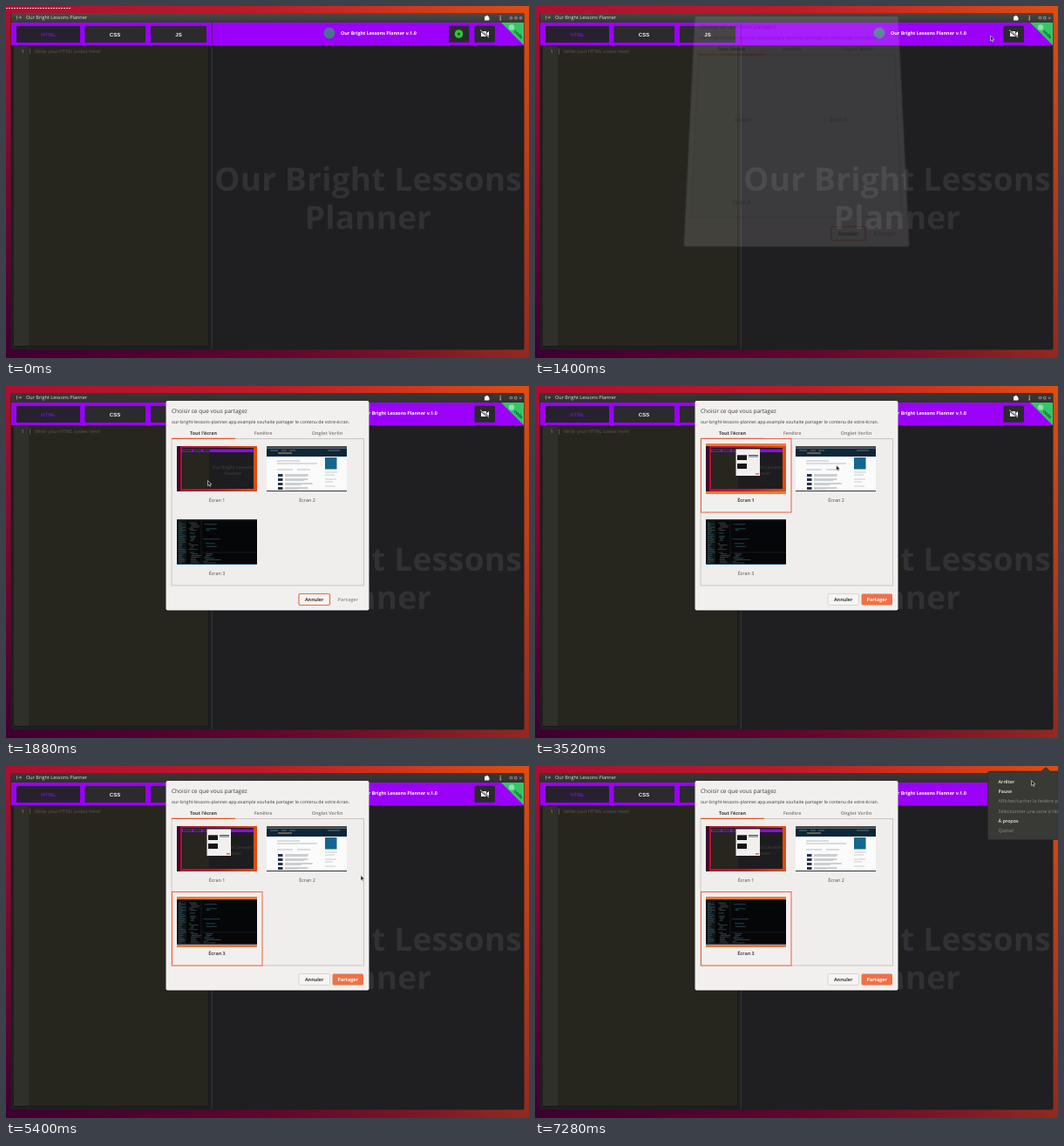
An HTML page for the animation above (7.32 s loop, 600 px wide and 404 px high).

```html
<!DOCTYPE html>
<html lang="fr">
<head>
<meta charset="utf-8">
<title>Screen sharing</title>
<style>
  html, body { margin: 0; width: 100%; height: 100%; overflow: hidden; background: #8a1238; }
  svg { position: absolute; left: 0; top: 0; width: 600px; height: 404px; }
  text { font-family: "Open Sans", "Noto Sans", sans-serif; font-size: 5.4px; text-rendering: geometricPrecision; white-space: pre; }
  .mid { text-anchor: middle; }
  .bold { font-weight: 700; }
  .tab { font-family: "Liberation Sans", Arial, sans-serif; font-size: 6px; font-weight: 700; text-anchor: middle; fill: #f4f4f4; }
  .hero { font-size: 37px; font-weight: 700; letter-spacing: .2px; text-anchor: middle; fill: #313133; }
  .off { fill: #8c8a86; }
  #dialog { transform-origin: 300px 137px; }
</style>
</head>
<body>
<svg id="desktop" viewBox="0 0 600 404">
  <defs>
    <linearGradient id="wall">
      <stop offset="0" stop-color="#b01030"/>
      <stop offset=".5" stop-color="#bf1c28"/>
      <stop offset="1" stop-color="#e04e12"/>
    </linearGradient>
    <linearGradient id="dusk" x2="0" y2="1">
      <stop offset="0" stop-color="#3a0030" stop-opacity="0"/>
      <stop offset="1" stop-color="#3a0030"/>
    </linearGradient>
    <linearGradient id="duskFade">
      <stop offset="0" stop-color="#fff"/>
      <stop offset="1" stop-color="#777"/>
    </linearGradient>
    <mask id="duskMask"><rect width="600" height="404" fill="url(#duskFade)"/></mask>
    <linearGradient id="bar" x2="0" y2="1">
      <stop offset="0" stop-color="#4b4a46"/>
      <stop offset="1" stop-color="#393834"/>
    </linearGradient>
  </defs>
  <rect width="600" height="404" fill="url(#wall)"/>
  <rect width="600" height="404" fill="url(#dusk)" mask="url(#duskMask)"/>
  <path id="dashes" d="M0 2.5H74" stroke="#e8d8dc" stroke-dasharray="2 1"/>

  <rect x="5.500" y="8" width="589" height="386.500" rx="2" fill="#1f1e20"/>
  <rect x="6" y="8" width="588" height="11" rx="2" fill="url(#bar)"/>
  <rect id="barShade" x="6" y="8" width="588" height="11" rx="2" fill="#2d2c2a"/>
  <path d="M12.500 11V15.500M14 13.200H17.500M15.800 11.800L17.500 13.200 15.800 14.600" fill="none" stroke="#a5a4a0" stroke-width=".8"/>
  <text x="23" y="15.200" fill="#e2e1dc" style="font-size:5.500px">Our Bright Lessons Planner</text>
  <path d="M549 12h1.500a1.200 1.200 0 0 1 2.400 0H554v1.600a1.200 1.200 0 0 1 0 2.300V16.500H549z" fill="#f5f5f5"/>
  <g fill="#e8e8e8"><circle cx="567.200" cy="11.600" r=".7"/><circle cx="567.200" cy="13.700" r=".7"/><circle cx="567.200" cy="15.800" r=".7"/></g>
  <g id="dots" fill="#77756f"><circle cx="579.500" cy="13.700" r="2"/><circle cx="585" cy="13.700" r="2"/><circle cx="590.500" cy="13.700" r="2"/></g>
  <path id="controls" d="M578 12.600h3v2h-3zM583.500 12.500h2.500v2.500h-2.500zM589 12.500l2.500 2.500M591.500 12.500l-2.500 2.500" fill="none" stroke="#a9a7a1" stroke-width=".7"/>

  <rect x="6" y="19" width="588" height="26.300" fill="#9a00fa"/>
  <path d="M236.500 19V45.300" stroke="#5c1590"/>
  <rect x="12" y="23" width="73" height="19" rx="1" fill="#27212f"/>
  <rect x="90.500" y="23" width="69.500" height="19" rx="1" fill="#2b2a2d"/>
  <rect x="166" y="23" width="64" height="19" rx="1" fill="#2b2a2d"/>
  <text class="tab" x="48.500" y="34.500" style="fill:#6c16b4">HTML</text>
  <text class="tab" x="125" y="34.500">CSS</text>
  <text class="tab" x="198" y="34.500">JS</text>

  <g id="brand">
    <circle cx="371" cy="31" r="6.500" fill="#4a7391"/>
    <text class="bold" x="384" y="33" fill="#fff">Our Bright Lessons Planner v.1.0</text>
  </g>
  <g id="record">
    <rect x="508" y="22.700" width="23.500" height="19" rx="1.500" fill="#2a2a2c"/>
    <circle cx="519.500" cy="32" r="4.800" fill="#2fc43f"/><circle cx="519.500" cy="32" r="1.500" fill="#17471d"/>
  </g>
  <rect x="537.500" y="22.700" width="23.500" height="19" rx="1.500" fill="#2a2a2c"/>
  <path d="M545 29h6v6h-6zM551.500 31l2.500-2v6l-2.500-2z" fill="#fff"/>
  <path d="M544 28l10 8" stroke="#2a2a2c" stroke-width="1.800"/><path d="M544 27.500l10 8.500" stroke="#fff" stroke-width=".8"/>
  <path d="M568 19H594V45z" fill="#32c766"/>
  <circle cx="580" cy="24.500" r="3.200" fill="#8ce0a8"/>
  <text class="bold" transform="translate(582.500 29.500) rotate(46)" fill="#164d29" style="font-size:5px">code</text>

  <rect x="9" y="46" width="224" height="345" fill="#26261f"/>
  <rect x="9" y="46" width="17" height="345" fill="#30302a"/>
  <path d="M232.500 46V391M9 390.500H233" stroke="#191919"/>
  <rect x="235.500" y="45.300" width="1.500" height="348.700" fill="#302f33"/>
  <text x="17.500" y="54.300" fill="#a0a09a">1</text>
  <path d="M27.500 49V55.500" stroke="#77776f" stroke-width=".6"/>
  <text x="33" y="54.300" fill="#55554e" style="font-family:'Liberation Sans',Arial,sans-serif;font-size:5.800px">Write your HTML codes here!</text>
  <text class="hero" x="415.500" y="211.500">Our Bright Lessons</text>
  <text class="hero" x="415.500" y="256">Planner</text>
</svg>

<svg id="dialog" viewBox="0 0 600 404">
  <rect x="183" y="17" width="234" height="242" rx="3" fill="#000" opacity=".3"/>
  <rect x="183.500" y="17" width="233" height="240.500" rx="2" fill="#f2f0ee"/>
  <text x="190" y="31" fill="#3b3b3b" style="font-size:6.500px">Choisir ce que vous partagez</text>
  <text x="190" y="42.700" fill="#3b3b3b" style="font-size:5.150px">our-bright-lessons-planner.app.example souhaite partager le contenu de votre écran.</text>
  <text class="mid bold" x="226.500" y="55.700" fill="#3b3b3b">Tout l'écran</text>
  <text class="mid bold off" x="295" y="55.700">Fenêtre</text>
  <text class="mid bold off" x="368.500" y="55.700">Onglet Vorlin</text>
  <rect x="190" y="60.500" width="220.500" height="168.500" fill="#f0eeec" stroke="#c3bfba" stroke-width=".9"/>
  <path d="M190 60.300H263" stroke="#e95420" stroke-width="1.200"/>
  <g id="choice">
    <rect x="190.500" y="60.500" width="103.500" height="84.500" fill="#f2f0ee" stroke="#e8603f"/>
    <rect x="196" y="66" width="92" height="58" fill="#f0783a"/>
  </g>
  <g id="labels" fill="#444"></g>

  <g id="previews">
    <g transform="translate(196 69)">
      <rect width="92" height="52" fill="url(#wall)"/>
      <rect width="4" height="52" fill="#3d0b2b"/>
      <rect x="6" y="2" width="82" height="47" fill="#1d1d1f"/>
      <rect x="6" y="3.500" width="82" height="3.500" fill="#8f0cdf"/>
      <path d="M7 4.300h10v2H7zM19 4.300h9v2H19zM30 4.300h8v2H30z" fill="#2b2a2d"/>
      <rect x="7" y="7.500" width="30" height="41" fill="#26261f"/>
      <g class="mid bold" fill="#38383b"><text x="64" y="26" style="font-size:5px">Our Bright Lessons</text><text x="64" y="32.500" style="font-size:5px">Planner</text></g>
      <g id="miniDialog">
        <rect x="34.500" y="3.500" width="27.500" height="30.500" fill="#f2f0ee"/>
        <path d="M36 10h11v6H36zM36 20h11v6H36z" fill="#191419"/>
        <path d="M36 10h11v1H36z" fill="#a61ab5"/>
        <path d="M49 10.500h11M49 12h11" stroke="#26384a" stroke-width=".8"/>
        <rect x="57" y="31" width="4" height="1.600" fill="#ed6d3d"/>
      </g>
    </g>

    <g transform="translate(299 69)">
      <rect width="92" height="52" fill="#fbfbfb"/>
      <rect width="92" height="2.500" fill="#4b4945"/>
      <rect y="2.500" width="92" height="9.500" fill="#0e2636"/>
      <path d="M4 5h9M17 5h6M26 5h7M70 5h14" stroke="#7793a5" stroke-width=".7"/>
      <path d="M13 8h16" stroke="#d69c52" stroke-width="1"/>
      <path d="M12 17h26M12 20h46M12 27h18M35 27h15" stroke="#a8adb1" stroke-width=".8"/>
      <rect x="67" y="13" width="13.500" height="13.500" fill="#126791"/>
      <path d="M67 30h14M67 33h11M67 38h13M67 41h9M67 46h12" stroke="#b9bec1" stroke-width=".8"/>
      <g id="rows"></g>
      <rect y="51" width="92" height="1" fill="#333"/>
    </g>

    <g transform="translate(196 153)">
      <rect width="92" height="52" fill="#050608"/>
      <rect width="11" height="52" fill="#0c1519"/>
      <rect width="92" height="1.500" fill="#272727"/>
      <path d="M28 1.500V52M28 38H92" stroke="#242a2d" stroke-width=".6"/>
      <g id="code"></g>
      <rect y="51" width="92" height="1" fill="#174d70"/>
    </g>
  </g>

  <rect id="cancel" x="336" y="238.500" width="35.500" height="13" rx="1.500" fill="#f6f5f3"/>
  <text class="mid bold" x="353.700" y="247" fill="#3b3b3b">Annuler</text>
  <rect id="share" x="374.500" y="238.500" width="35.500" height="13" rx="1.500"/>
  <text id="shareText" class="mid bold" x="392.200" y="247">Partager</text>
</svg>

<svg id="overlay" viewBox="0 0 600 404">
  <g id="menu">
    <path d="M519.500 8q0-2 2-2H581l5-4.500 5 4.500H600V84.500H521.500q-2 0-2-2z" fill="#393936" stroke="#2a2a28" stroke-width=".6"/>
    <g id="items"></g>
  </g>
  <g id="cursor">
    <path id="arrow" d="M0 0V6L1.400 4.800 2.300 6.800 3.300 6.400 2.400 4.400H4.300z" fill="#111" stroke="#f4f4f4" stroke-width=".6"/>
    <path id="hand" d="M-.5 0q.7-.8 1.300 0V1.800L3.300 2.500V4.500L2.500 6H-.5L-1.700 3.600-1.200 3-.5 3.600z" fill="#f4f4f4" stroke="#111" stroke-width=".4"/>
  </g>
</svg>

<script>
const LOOP = 7320;
const $ = id => document.getElementById(id);
const clamp = v => Math.max(0, Math.min(1, v));
const show = (id, on) => { $(id).style.display = on ? '' : 'none'; };
const set = (id, attrs) => { for (const k in attrs) $(id).setAttribute(k, attrs[k]); };

let seed = 7;
const random = () => (seed = seed * 16807 % 2147483647) / 2147483647;
const dash = (x, y, w, color) => `<path d="M${x} ${y}h${w}" stroke="${color}" stroke-width=".7"/>`;

function fillDetails() {
  const tints = ['#37555c', '#4b5960', '#2d6170', '#59503e'];
  let code = '', rows = '', items = '';
  for (let y = 4; y < 50; y += 1.7) {
    const tint = () => tints[Math.floor(random() * tints.length)];
    code += dash(2, y, 3 + random() * 6, tint());
    if (random() < .8) code += dash(13 + random() * 4, y, 3 + random() * 8, tint());
    if (random() < .3 || y > 39) code += dash(30 + random() * 4, y, 3 + random() * 16, tint());
  }
  for (let y = 33; y < 50; y += 5) {
    rows += `<rect x="13" y="${y - 1}" width="5.500" height="3" fill="#25324a"/>` +
      dash(21, y, 20 + random() * 15, '#73797e') + dash(21, y + 1.6, 14 + random() * 12, '#b5babd');
  }
  ['Arrêter', 'Pause', "Afficher/cacher la fenêtre principale", "Sélectionner une zone à l'écran", 'À propos', 'Quitter']
    .forEach((label, i) => {
      const active = [0, 1, 4].includes(i);
      items += `<text x="531.500" y="${20 + i * 11.2}" fill="${active ? '#eeece8' : '#8d8b86'}" font-weight="${active ? 600 : 400}">${label}</text>`;
    });
  $('code').innerHTML = code;
  $('rows').innerHTML = rows;
  $('items').innerHTML = items;
  $('labels').innerHTML = [[242, 133], [345.5, 133], [242, 217]]
    .map(([x, y], i) => `<text class="mid" x="${x}" y="${y}">Écran ${i + 1}</text>`).join('');
}

// time, x, y
const path = [
  [80, 606, -10], [640, 511, 25.5], [900, 511, 25.5], [1080, 519, 31], [1320, 522.5, 34],
  [1680, 522.5, 34], [1880, 231.5, 108.5], [2480, 232, 109], [3200, 345.5, 91], [3880, 346, 91],
  [4400, 240, 168], [4680, 236, 168], [5000, 236, 168], [5400, 407, 125.5], [5720, 590, 2],
  [6400, 590, 2], [7000, 574, 34], [7260, 569.5, 16.5]
];

function cursorAt(t) {
  const next = path.findIndex(p => p[0] > t);
  if (next === 0) return path[0].slice(1);
  if (next < 0) return path[path.length - 1].slice(1);
  const [t0, x0, y0] = path[next - 1], [t1, x1, y1] = path[next];
  const u = (t - t0) / (t1 - t0), e = u * u * (3 - 2 * u);
  return [x0 + (x1 - x0) * e, y0 + (y1 - y0) * e];
}

function draw(t) {
  show('dashes', t < 80);
  show('dots', t < 400);
  show('controls', t >= 400);

  const recording = t >= 1200;
  show('record', !recording);
  set('brand', { transform: `translate(${recording ? 24 : 0} 0)` });

  // The dialog tilts flat about its horizontal axis while fading in.
  const open = clamp((t - 1374) / 200), rest = 1 - open;
  const dialog = $('dialog').style;
  dialog.opacity = open;
  dialog.transform = open < 1
    ? `matrix3d(${1 + .06 * rest},0,0,0,0,${1 + .11 * rest},0,${-.0005 * rest},0,0,1,0,0,0,0,1)` : 'none';
  $('barShade').style.opacity = open * .6;
  show('previews', t >= 1680);

  const chosen = t < 2480 ? 0 : t < 5000 ? 1 : 3;
  show('choice', chosen > 0);
  set('choice', { transform: `translate(0 ${chosen === 3 ? 84 : 0})` });
  [...$('labels').children].forEach((label, i) => { label.style.fontWeight = i + 1 === chosen ? 700 : 400; });
  set('cancel', { stroke: chosen ? '#d3cfca' : '#e86a45', 'stroke-width': chosen ? .8 : 1.2 });
  set('share', { fill: chosen ? '#ef7146' : '#f2f0ee' });
  set('shareText', { fill: chosen ? '#fff' : '#9b9894' });
  show('miniDialog', t >= 2560);

  show('menu', t >= 6400);
  const [x, y] = cursorAt(t);
  const pointing = t > 560 && t < 1200;
  set('cursor', { transform: `translate(${x} ${y})` });
  show('hand', pointing);
  show('arrow', !pointing);
}

fillDetails();
const start = performance.now();
function tick() {
  draw((performance.now() - start) % LOOP);
  requestAnimationFrame(tick);
}
tick();
</script>
</body>
</html>
```
